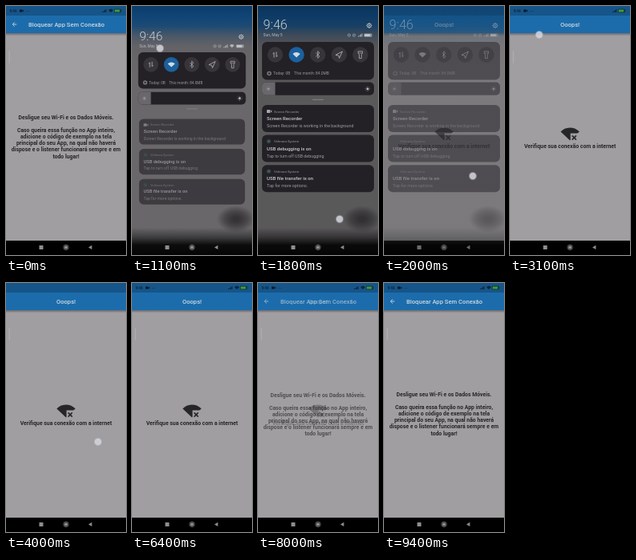
An HTML page with a canvas for the animation above (9.6 s loop, 150x312 px).

```html
<!DOCTYPE html>
<html lang="pt">
<head>
<meta charset="utf-8">
<title>Sem conexão</title>
<style>
html, body { margin: 0; width: 100%; height: 100%; overflow: hidden; background: #000; }
canvas { display: block; width: 150px; height: 312px; }
</style>
</head>
<body>
<canvas id="stage"></canvas>
<script>
const W = 150, H = 312, LOOP = 9600, STEP = 100;
const canvas = document.getElementById('stage');
const c = canvas.getContext('2d');
const dpr = window.devicePixelRatio || 1;
canvas.width = W * dpr;
canvas.height = H * dpr;

const FONT = 'Roboto, "Open Sans", sans-serif';
const BAR = '#1c6cab', STATUS = '#165589', BODY = '#a09ea1', INK = '#262528';
const CARD = '#232126';

const ramp = (t, a, b) => Math.min(1, Math.max(0, (t - a) / (b - a)));
const ease = k => 1 - (1 - k) ** 3;
const mix = (a, b, k) => a + (b - a) * k;

function text(s, x, y, size, color, weight = 400, align = 'left') {
  c.font = `${weight} ${size}px ${FONT}`;
  c.textAlign = align;
  c.fillStyle = color;
  c.fillText(s, x, y);
}

function rect(x, y, w, h, color, r = 0) {
  c.fillStyle = color;
  c.beginPath();
  c.roundRect(x, y, w, h, r);
  c.fill();
}

function disc(x, y, r, color) {
  c.fillStyle = color;
  c.beginPath();
  c.arc(x, y, r, 0, 7);
  c.fill();
}

function ring(x, y, r, color, width = 0.8) {
  c.strokeStyle = color;
  c.lineWidth = width;
  c.beginPath();
  c.arc(x, y, r, 0, 7);
  c.stroke();
}

// pts: flat list x, y, x, y...
function line(pts, color, width = 0.9, fill = false) {
  c.beginPath();
  for (let i = 0; i < pts.length; i += 2) c.lineTo(pts[i], pts[i + 1]);
  if (fill) {
    c.fillStyle = color;
    c.fill();
  } else {
    c.strokeStyle = color;
    c.lineWidth = width;
    c.stroke();
  }
}

function fan(x, y, r, color) {
  c.fillStyle = color;
  c.beginPath();
  c.moveTo(x, y);
  c.arc(x, y, r, -Math.PI * 0.76, -Math.PI * 0.24);
  c.fill();
}

function layer(alpha, draw) {
  if (alpha <= 0) return;
  c.save();
  c.globalAlpha *= alpha;
  draw();
  c.restore();
}

// Scale about a point, then shift down
function placed(cx, cy, k, dy, draw) {
  c.save();
  c.translate(cx, cy + dy);
  c.scale(k, k);
  c.translate(-cx, -cy);
  draw();
  c.restore();
}

function bars(x, y, color) {
  for (let i = 0; i < 4; i++) rect(x + i * 1.5, y - 1 - i, 1, 1 + i, color);
}

function rays(x, y, r0, r1, color, width) {
  for (let i = 0; i < 8; i++) {
    const a = i * Math.PI / 4, u = Math.cos(a), v = Math.sin(a);
    line([x + u * r0, y + v * r0, x + u * r1, y + v * r1], color, width);
  }
}

function gear(x, y) {
  ring(x, y, 2.4, '#ccc', 0.9);
  disc(x, y, 0.9, '#ccc');
  rays(x, y, 2.5, 3.4, '#ccc', 1);
}

function sun(x, y, color) {
  disc(x, y, 1.5, color);
  rays(x, y, 2.3, 3.2, color, 0.6);
}

function camera(x, y, color, k = 1) {
  rect(x, y - 1.6 * k, 3.6 * k, 3.2 * k, color, 0.5);
  line([x + 3.8 * k, y, x + 5.2 * k, y - 1.4 * k, x + 5.2 * k, y + 1.4 * k], color, 1, true);
}

function statusIcons(t) {
  const ink = '#0d2438';
  text('9:46', 4.5, 7.8, 4.6, ink, 500);
  camera(17, 6, '#0a1722');
  text('···', 25, 7.6, 4.5, ink, 700);
  const wifi = t < 1600 || t >= 5300;
  const wide = t < 1600 || t >= 5700;
  bars(wide ? 120 : 128, 8, ink);
  if (wifi && wide) fan(131, 8, 4, ink);
  rect(135, 3.8, 8.6, 4.4, '#12301f', 1);
  rect(135.7, 4.5, 6.6, 3, '#3f9b45', 0.5);
  rect(143.7, 5.2, 0.6, 1.6, '#12301f');
}

function frameBase() {
  rect(0, 0, W, H, BODY);
  const g = c.createLinearGradient(0, 34, 0, 37.5);
  g.addColorStop(0, 'rgba(40,40,45,.45)');
  g.addColorStop(1, 'rgba(40,40,45,0)');
  rect(0, 34, W, 3.5, g);
  rect(0, 12, W, 22, BAR);
  rect(0, 0, W, 12, STATUS);
  rect(3.6, 56, 1, 16, '#b2b0b3', 0.5);
}

function navIcons(ink) {
  rect(41.5, 300, 5, 5, ink, 0.6);
  disc(75, 302.4, 2.2, ink);
  ring(75, 302.4, 3.2, ink, 0.7);
  line([103, 302.4, 107.4, 299.8, 107.4, 305], ink, 1, true);
}

function helpPage(dy) {
  const white = '#c9d8e4';
  line([13.2, 23, 8.4, 23], white, 0.9);
  line([10.8, 20.4, 8.2, 23, 10.8, 25.6], white, 0.9);
  text('Bloquear App Sem Conexão', 28, 25.8, 7.64, white, 500);
  const rows = [
    'Desligue seu Wi-Fi e os Dados Móveis.', '',
    'Caso queira essa função no App inteiro,',
    'adicione o código de exemplo na tela',
    'principal do seu App, na qual não haverá',
    'dispose e o listener funcionará sempre e em',
    'todo lugar!'
  ];
  rows.forEach((s, i) => text(s, 75, 142.2 + i * 8.05 + dy, 6.87, INK, 700, 'center'));
}

function offlinePage() {
  text('Ooops!', 75, 25.8, 7.64, '#c9d8e4', 500, 'center');
  c.save();
  c.beginPath();
  c.rect(60, 148, 30, 11.5);
  c.rect(60, 159, 15.6, 12);
  c.clip();
  fan(75, 168.4, 16, INK);
  c.restore();
  line([77.6, 162.4, 82.8, 167.6], INK, 1.5);
  line([82.8, 162.4, 77.6, 167.6], INK, 1.5);
  text('Verifique sua conexão com a internet', 75, 177.8, 6.87, INK, 700, 'center');
}

// The blurred page, darker once the shade is fully open
function backdrop(settle) {
  const g = c.createLinearGradient(0, 0, 0, H);
  [[0, '#0d3c69'], [0.04, '#0f4577'], [0.08, '#1d4a74'], [0.12, '#4a5868'],
   [0.16, '#636266'], [0.25, '#696769'], [0.89, '#696769'], [0.93, '#3c3b3d'],
   [0.96, '#0c0c0c'], [1, '#050505']]
    .forEach(([p, col]) => g.addColorStop(p, col));
  rect(0, 0, W, H, g);
  rect(0, 0, W, H, `rgba(0,0,0,${0.14 * settle})`);
  c.save();
  c.translate(130, 267);
  c.scale(1, 0.7);
  const b = c.createRadialGradient(0, 0, 4, 0, 0, 24);
  b.addColorStop(0, 'rgba(40,38,41,.8)');
  b.addColorStop(0.5, 'rgba(40,38,41,.5)');
  b.addColorStop(1, 'rgba(40,38,41,0)');
  rect(-24, -24, 48, 48, b);
  c.restore();
}

function shadeHeader(wifi) {
  text('9:46', 6.5, 28.8, 16.2, '#c6ccd2', 300);
  text('Sun, May 5', 6.5, 38.4, 5, '#b4b8bd');
  gear(139, 24.5);
  const ink = '#b0b3b8', x = wifi ? 103 : 112;
  ring(x + 1.8, 36.6, 1.7, ink, 0.6);
  line([x + 1.8, 35.6, x + 1.8, 36.7, x + 2.7, 36.7], ink, 0.5);
  ring(x + 8, 36.6, 1.7, ink, 0.6);
  line([x + 6.8, 37.8, x + 9.2, 35.4], ink, 0.5);
  bars(x + 13, 38.5, ink);
  if (wifi) fan(x + 24, 38.5, 4, ink);
  rect(132.5, 34.5, 10, 4.3, '#8f9396', 1);
  rect(133.2, 35.2, 7, 2.9, '#c4c7ca', 0.5);
}

function tiles(wifi) {
  rect(5, 45, 140, 47.5, CARD, 6);
  const ink = '#b2b0b5', y = 61;
  for (let i = 0; i < 5; i++)
    disc(21.5 + i * 26.6, y, 9.7, i === 1 && wifi ? '#1c609e' : '#37353a');
  // mobile data
  line([20, 64.6, 20, 58.4, 18.6, 60], ink);
  line([23, 57.4, 23, 63.6, 24.4, 62], ink);
  fan(48.1, 64.4, 6.4, wifi ? '#cfdbe6' : ink);
  // bluetooth
  line([72.4, 58.6, 77, 63.2, 74.7, 65.4, 74.7, 56.6, 77, 58.8, 72.4, 63.4], ink, 0.8);
  // location
  line([97, 61.4, 105.4, 57, 101.6, 65.4, 100.6, 62, 97, 61.4], ink, 0.9);
  // torch
  line([125.2, 56.8, 130.6, 56.8, 130.6, 59, 129.3, 60.8, 129.3, 65.6, 126.5, 65.6,
        126.5, 60.8, 125.2, 59, 125.2, 56.8], ink, 0.8);
  line([125.4, 59, 130.4, 59], ink, 0.6);
  disc(14, 84.5, 2.8, '#77767a');
  disc(14, 84.5, 1.2, '#2a292d');
  text('Today: 0B', 19, 86.4, 4.9, '#9a989d');
  text('This month: 84.0MB', 45, 86.4, 4.9, '#9a989d');
}

function brightness() {
  rect(5, 95.5, 140, 16.2, CARD, 5);
  rect(5, 95.5, 16.5, 16.2, '#69676b', [5, 0, 0, 5]);
  sun(13, 103.8, '#98969b');
  sun(137, 103.8, '#bbb9be');
  rect(68, 116.8, 14, 1.2, '#7d7b7f', 0.6);
}

const notes = [
  ['Screen Recorder', 'Screen Recorder', 'Screen Recorder is working in the background'],
  ['Velmora System', 'USB debugging is on', 'Tap to turn off USB debugging'],
  ['Velmora System', 'USB file transfer is on', 'Tap for more options.']
];

function note([app, title, body], i) {
  const y = 124 + i * 37.6;
  rect(5, y, 140, 34, CARD, 6);
  if (i) disc(13.5, y + 8, 2.4, '#3b5656');
  else camera(11, y + 8, '#a9a7ac', 1.2);
  text(app, 20, y + 9.5, 4.3, '#98969b');
  text(title, 11, y + 18.9, 6, '#cbc9ce', 500);
  text(body, 11, y + 27.9, 5.35, '#9f9da2');
}

// settle runs from 0 (still pulled down) to 1 (at rest)
function shade(tileOn, online, settle) {
  backdrop(settle);
  const k = mix(0.96, 1, settle), pull = 1 - settle;
  placed(75, 30, k, 14 * pull, () => shadeHeader(online));
  placed(75, 69, k, 12 * pull, () => tiles(tileOn));
  placed(75, 104, k, 12 * pull, brightness);
  layer(mix(0.62, 1, settle), () => notes.forEach((n, i) =>
    placed(75, 141 + i * 37.6, mix(0.945, 1, settle), 16.5 * pull, () => note(n, i))));
  navIcons('#8e8e8e');
}

// Each stroke: [time, x, y] points
const strokes = [
  [[400, 37, 4], [800, 36, 22], [1100, 35, 53], [1250, 35, 88]],
  [[1500, 48, 61], [1600, 48, 61]],
  [[1700, 102, 267], [1850, 102, 267], [2050, 114, 195]],
  [[3000, 37, 10], [3100, 36.5, 36], [3250, 35, 88]],
  [[3400, 48, 61], [3500, 48, 61]],
  [[3700, 102, 267], [3800, 104, 262], [4000, 115, 199], [4100, 116, 188]],
  [[8800, 122.5, 264.5], [8850, 122.5, 264.5]]
];

function touch(t) {
  for (const s of strokes) {
    const end = s[s.length - 1];
    if (t < s[0][0] || t >= end[0] + 150) continue;
    let [, x, y] = end;
    const i = s.findIndex(p => t <= p[0]);
    if (i > 0) {
      const a = s[i - 1], b = s[i], k = ramp(t, a[0], b[0]);
      x = mix(a[1], b[1], k);
      y = mix(a[2], b[2], k);
    } else if (i === 0) {
      [, x, y] = s[0];
    }
    layer(1 - ramp(t, end[0], end[0] + 150), () => {
      disc(x, y, 5.2, 'rgba(200,208,222,.3)');
      disc(x, y, 4.2, 'rgba(214,214,220,.8)');
    });
  }
}

function draw(t) {
  c.setTransform(dpr, 0, 0, dpr, 0, 0);
  frameBase();
  const first = t < 2500;
  const back = ramp(t, 7800, 8100);
  const help = first ? 1 - ramp(t, 1800, 2000) : back;
  layer(help, () => helpPage(first ? 0 : 22 * (1 - ease(back))));
  layer(1 - help, offlinePage);

  const hidden = (t >= 800 && t < 2400) || (t >= 3200 && t < 4300);
  const fresh = t < 800 || (t >= 3000 && t < 3200);
  const shown = t < 3000 ? ramp(t, 2300, 2500) : ramp(t, 4200, 4500);
  if (!hidden) layer(fresh ? 1 : shown, () => statusIcons(t));
  rect(0, 294, W, 18, '#000');
  navIcons('#8e8e8e');

  if (first) {
    // the tile keeps its colour until the radio has stopped
    layer(ramp(t, 700, 1080) * (1 - ramp(t, 1850, 2150)),
      () => shade(t < 1900, t < 1600, ease(ramp(t, 1100, 1400))));
  } else {
    layer(ramp(t, 3100, 3300) * (1 - ramp(t, 3780, 3990)),
      () => shade(t >= 3500, false, ease(ramp(t, 3200, 3450))));
  }
  touch(t);
}

function tick() {
  const t = performance.now() % LOOP;
  draw(Math.floor(t / STEP) * STEP);
  requestAnimationFrame(tick);
}
tick();
</script>
</body>
</html>
```
